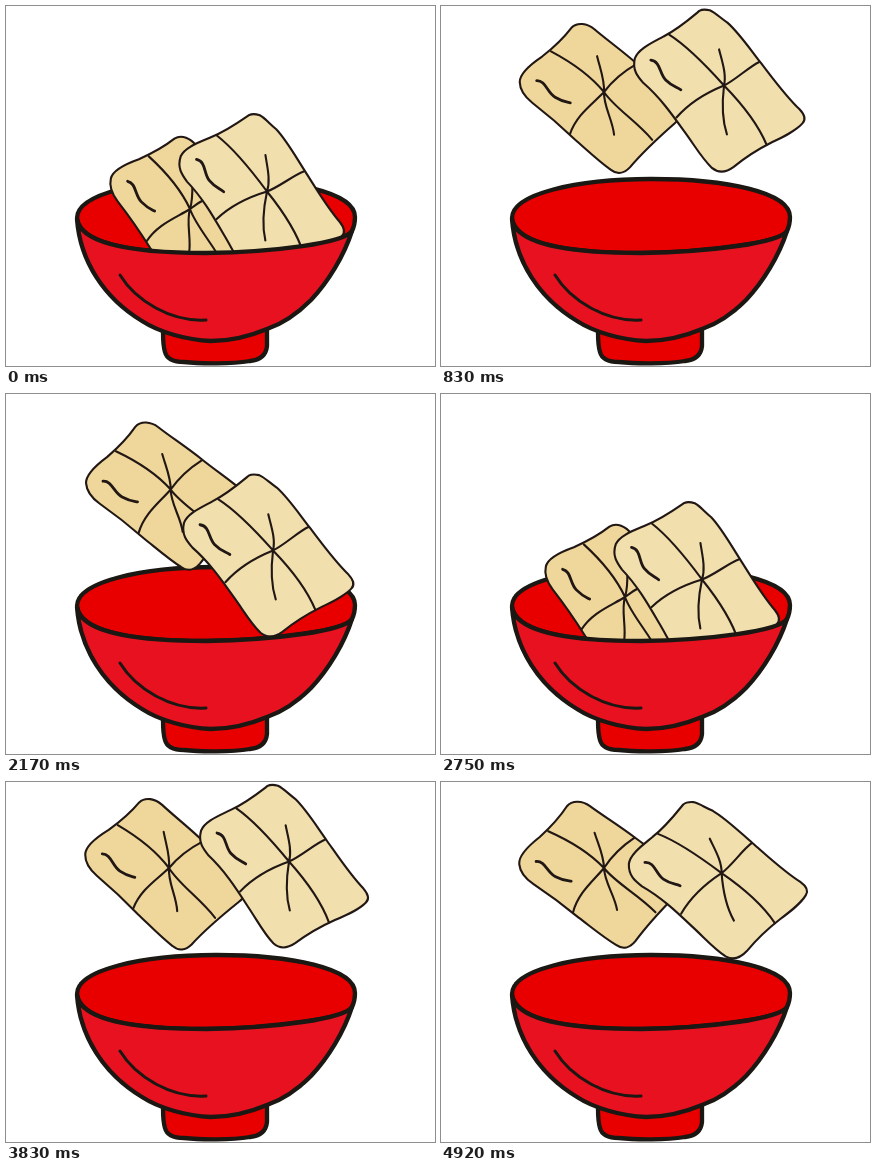
An HTML page that plays this animation: 429 by 360 pixels, repeating every 5000 ms.

```html
<!DOCTYPE html>
<html lang="en">
<head>
<meta charset="utf-8">
<title>Parcels and bowl</title>
<style>
  html, body { margin: 0; width: 100%; height: 100%; overflow: hidden; background: #fff; }
  svg { display: block; width: 429px; height: 360px; }
  path { fill: none; stroke: #211714; stroke-width: 2.1; stroke-linecap: round; stroke-linejoin: round; }
  .mark { stroke-width: 2.8; }
  .bowl path { stroke: #1b1712; stroke-width: 4.3; }
  .bowl .inside, .bowl .foot { fill: #e80000; }
  .bowl .body { fill: #e81120; }
  .bowl .shine { stroke-width: 3; }
  #left .paper { fill: #efd69b; }
  #right .paper { fill: #f1dfae; }
</style>
</head>
<body>
<svg viewBox="0 0 429 360">
  <g class="bowl">
    <path class="inside" d="M71 212C71 188 135 173 210 173C285 173 349 186 349 211C349 217 348 221 346 225C340 236 270 246 200 247C120 247 74 236 71 212Z"/>
  </g>

  <g id="left">
    <path class="paper" d="M-31-65C-39-55-49-46-61-37C-72-30-84-20-84-12C-84-2-78 4-72 9C-56 22-42 35-30 47C-18 58-6 70 5 78C11 83 18 82 24 76C40 58 58 43 70 33C78 27 79 18 74 9C62-4 48-14 33-28C19-41 3-53-8-63C-15-69-25-71-31-65Z"/>
    <path d="M-52-42C-36-33-14-18 0 0C10 16 32 30 47 49M33-27C20-20 8-10 0 0C-12 12-28 22-35 41M-6-36C-3-22 1-12 0 0C-1 14 8 28 9 43"/>
    <path class="mark" d="M-67-13C-58-13-57-1-49 4S-38 9-34 10"/>
  </g>

  <g id="right">
    <path class="paper" d="M-41-67C-50-55-58-44-70-34C-80-25-92-16-93-6C-93 6-86 11-79 16C-60 26-45 39-28 54C-15 65-5 76 7 83C15 87 22 84 28 77C38 64 48 54 60 44C70 36 80 28 85 19C88 14 85 10 79 6C62-4 46-18 30-31C14-44 2-55-11-62C-19-65-25-69-31-70C-36-70-39-69-41-67Z"/>
    <path d="M-65-37C-45-30-20-14 0 0C22 14 42 30 55 48M29-31C20-24 10-8 0 0C-17 12-31 27-39 42M-13-34C-8-24 0-12 0 0C2 18 6 34 14 47"/>
    <path class="mark" d="M-77-8C-67-9-66 3-58 8S-46 12-41 14"/>
  </g>

  <g class="bowl">
    <path class="foot" d="M157 326C157 334 157 340 159 346C161 354 168 356 178 356C195 358 225 358 244 355C254 354 260 350 261 340L261 322Z"/>
    <path class="body" d="M71 213C74 236 120 247 200 247C270 246 338 237 346 225C338 250 322 276 305 294C292 307 276 318 261 323C242 331 225 335 205 335C180 334 153 326 136 315C98 292 74 255 71 213Z"/>
    <path class="shine" d="M114 269C130 295 165 316 200 314"/>
  </g>
</svg>
<script>
  const LOOP = 5000, CYCLE = 2950, FPS = 12;

  // Each parcel rises out of the bowl, rocks once in the air and drops back.
  const parcels = [
    { el: document.getElementById("left"), low: [184, 203], high: [163, 86],
      tilt: [-5.5, 13], rise: [198, 678], rock: [678, 1190, 1205, 1690], fall: [2082, 2565] },
    { el: document.getElementById("right"), low: [261, 185.5], high: [283, 79.5],
      tilt: [0, 18.5], rise: [85, 530], rock: [530, 1000, 1070, 1530], fall: [1875, 2320] }
  ];

  const mix = (a, b, k) => a + (b - a) * k;

  function ease(t, from, to) {
    const s = Math.min(1, Math.max(0, (t - from) / (to - from)));
    return s * s * (3 - 2 * s);
  }

  function pose({ el, low, high, tilt, rise, rock, fall }, t) {
    const lift = ease(t, ...rise) - ease(t, ...fall);
    const sway = ease(t, rock[0], rock[1]) - ease(t, rock[2], rock[3]);
    const x = mix(low[0], high[0], lift);
    const y = mix(low[1], high[1], lift);
    const angle = mix(tilt[0], tilt[1], 1 - lift + sway);
    el.setAttribute("transform", `translate(${x} ${y}) rotate(${angle})`);
  }

  function draw(now) {
    const step = Math.floor(((now + 4) % LOOP) * FPS / 1000);
    const t = (step * 1000 / FPS) % CYCLE;
    parcels.forEach(p => pose(p, t));
  }

  let start;
  function tick(now) {
    start ??= now;
    draw(now - start);
    requestAnimationFrame(tick);
  }

  draw(0);
  requestAnimationFrame(tick);
</script>
</body>
</html>
```
